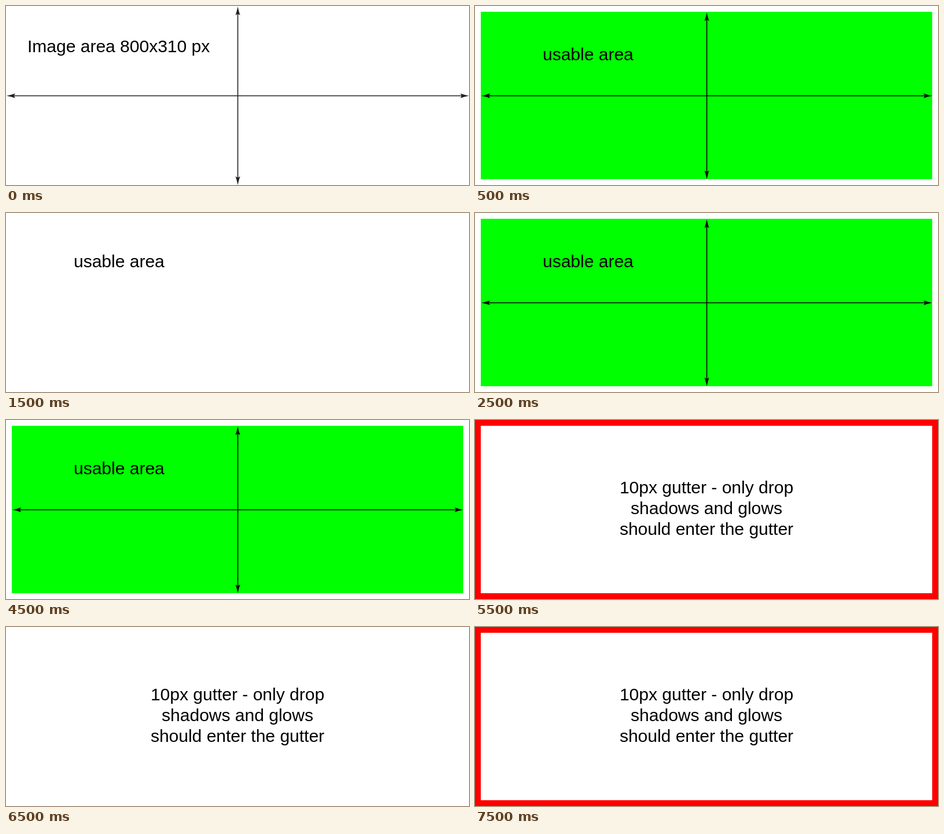
An HTML page that plays this animation: 800 by 310 pixels, repeating every 8 s.

```html
<!DOCTYPE html>
<html lang="en">
<meta charset="utf-8">
<title>Image area guide</title>
<style>
  html, body { margin: 0; width: 100%; height: 100%; overflow: hidden; background: #fff; }
  svg { display: block; }
  text { font: 30px "Liberation Sans", Arial, sans-serif; }
  .axes line { stroke: currentColor; stroke-width: 1.6; }
  .axes path { fill: currentColor; }
</style>
<svg width="800" height="310" viewBox="0 0 800 310">
  <defs>
    <path id="head" d="M0 0Q8 -1.5 15 -4L12.5 0L15 4Q8 1.5 0 0Z"/>
  </defs>
  <g id="image">
    <g class="axes" color="#231f20" data-inset="0"></g>
    <text x="37" y="80">Image area 800x310 px</text>
  </g>
  <g id="usableFill">
    <path fill="#0f0" d="M10 10H790V300H10Z"/>
    <g class="axes" color="#000" data-inset="10"></g>
  </g>
  <text id="usable" x="117" y="94">usable area</text>
  <path id="gutterFill" fill="none" stroke="#f00" stroke-width="10" d="M5 5H795V305H5Z"/>
  <g id="gutter" text-anchor="middle">
    <text x="400" y="127">10px gutter - only drop</text>
    <text x="400" y="163">shadows and glows</text>
    <text x="400" y="199">should enter the gutter</text>
  </g>
</svg>
<script>
  const LOOP = 8000, CX = 400.5, CY = 155.5;
  const byId = id => document.getElementById(id);

  for (const axes of document.querySelectorAll('.axes')) {
    const inset = +axes.dataset.inset;
    const left = inset + 1, right = 800 - inset, top = inset + 1, bottom = 310 - inset;
    const head = (x, y, angle) =>
      `<use href="#head" fill="currentColor" transform="translate(${x} ${y}) rotate(${angle})"/>`;
    axes.innerHTML =
      `<line x1="${left + 11}" y1="${CY}" x2="${right - 11}" y2="${CY}"/>` +
      `<line x1="${CX}" y1="${top + 11}" x2="${CX}" y2="${bottom - 11}"/>` +
      head(left, CY, 0) + head(right, CY, 180) + head(CX, top, 90) + head(CX, bottom, -90);
  }

  const parts = ['image', 'usableFill', 'usable', 'gutterFill', 'gutter'].map(byId);

  function draw(now) {
    const step = Math.floor((now % LOOP + 500) / 1000);
    const lit = step % 2 === 1;   // the coloured area blinks once a second
    const usable = step >= 1 && step <= 5;
    const gutter = step >= 6;
    const shown = [step === 0, usable && lit, usable, gutter && !lit, gutter];
    parts.forEach((part, i) => part.style.display = shown[i] ? '' : 'none');
  }

  const start = performance.now();
  function tick() {
    draw(performance.now() - start);
    requestAnimationFrame(tick);
  }
  tick();
</script>
</html>
```
